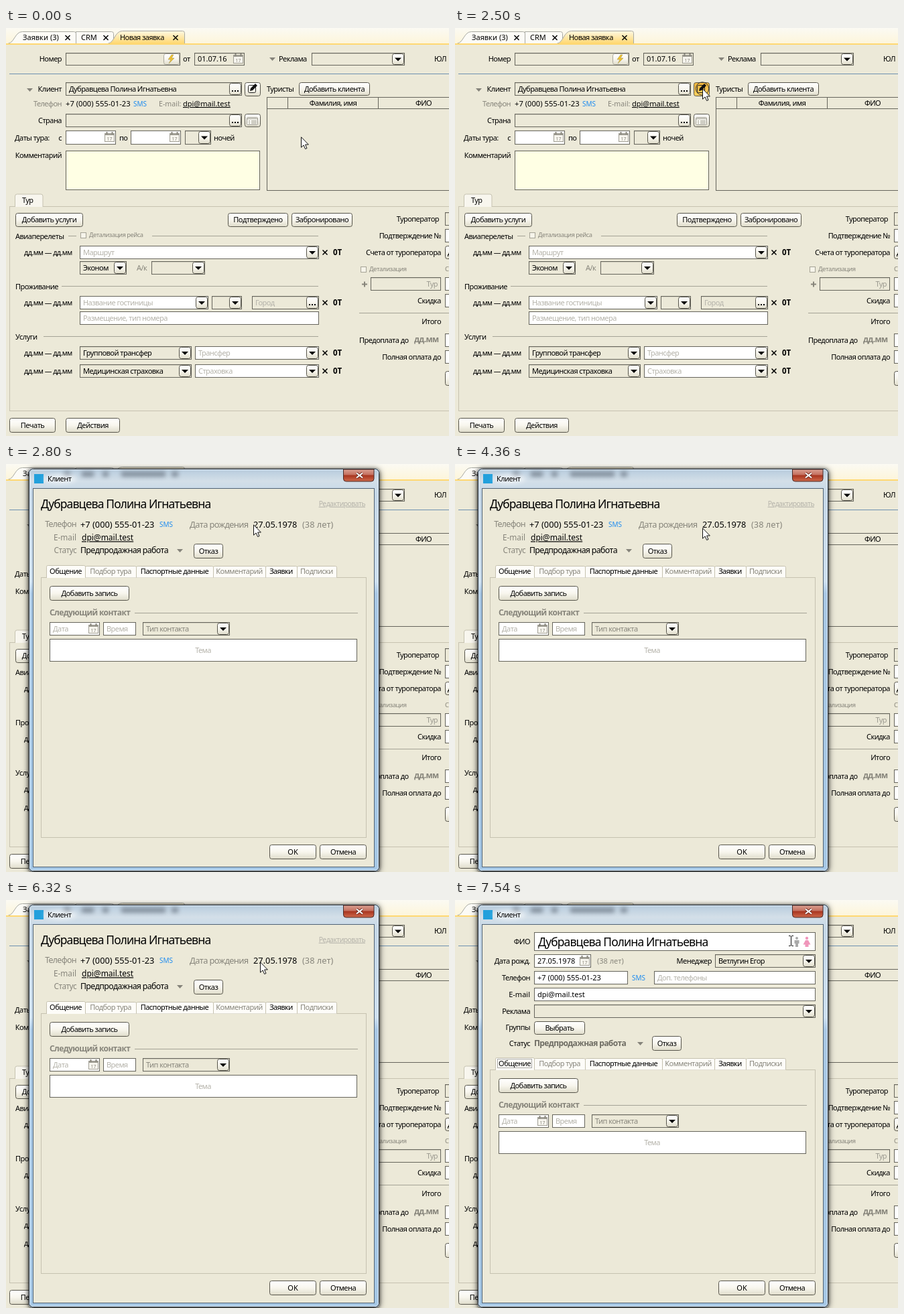
An HTML page that plays this animation: 661 by 609 pixels, repeating every 8 s.

```html
<!DOCTYPE html>
<html lang="ru">
<head>
<meta charset="utf-8">
<title>Заявка</title>
<style>
html, body { margin: 0; width: 100%; height: 100%; overflow: hidden; background: #ece9d8; }
svg { display: block; width: 661px; height: 609px; font-family: "Noto Sans", "Open Sans", sans-serif; }
.tight { letter-spacing: -.05em; }
</style>
</head>
<body>
<svg id="stage" viewBox="0 0 661 609" xmlns="http://www.w3.org/2000/svg"></svg>
<script>
const LOOP = 8000;
const BEIGE = '#ece9d8', WHITE = '#fff', EDGE = '#66655c', LINE = '#c6c2b0';
const GREY = '#87857b', PALE = '#b5b3aa', BLUE = '#1e8cf0';
const NAME = 'Дубравцева Полина Игнатьевна', PHONE = '+7 (000) 555-01-23', MAIL = 'dpi@mail.test';

// Boxes run from x1,y1 up to, not including, x2,y2; text is placed by its vertical centre
const box = (x1, y1, x2, y2, fill, edge = EDGE, r = 0) =>
  `<rect x="${x1 + .5}" y="${y1 + .5}" width="${x2 - x1 - 1}" height="${y2 - y1 - 1}" rx="${r}" fill="${fill}" stroke="${edge}"/>`;
const path = (d, fill = 'none', edge = 'none', more = '') =>
  `<path d="${d}" fill="${fill}" stroke="${edge}" ${more}/>`;
const hline = (x1, x2, y, c = '#a5a396') => path(`M${x1} ${y + .5}H${x2}`, 'none', c);
const text = (x, y, s, c = '#000', size = 11, more = '') =>
  `<text x="${x}" y="${y + size * .36}" fill="${c}" font-size="${size}" ${/[\da-z]/i.test(s) ? '' : 'class="tight"'} ${more}>${s}</text>`;
const textR = (x, y, s, c, size, more = '') => text(x, y, s, c, size, 'text-anchor="end" ' + more);
const textC = (x, y, s, c, size, more = '') => text(x, y, s, c, size, 'text-anchor="middle" ' + more);
const BOLD = 'font-weight="bold"', UNDER = 'text-decoration="underline"';
const at = (x, y, s) => `<g transform="translate(${x} ${y})">${s}</g>`;

// Widgets
const button = (x1, y1, x2, y2, s = '', id = '') =>
  `<g ${id && `id="${id}"`}>${box(x1, y1, x2, y2, 'url(#btn)', '#57554b', 3)}</g>` +
  textC((x1 + x2) / 2, (y1 + y2) / 2, s);
const field = (x1, y1, x2, y2, s = '', fill = WHITE, c = PALE) =>
  box(x1, y1, x2, y2, fill) +
  (fill === BEIGE ? hline(x1 + 1, x2 - 1, y1 + 1, '#d3d0c0') : '') +
  text(x1 + 5, (y1 + y2) / 2, s, c);
const combo = (x1, y1, x2, y2, s, fill, c) => {
  const cx = x2 - 10, cy = (y1 + y2) / 2;
  return field(x1, y1, x2, y2, s, fill, c) +
    box(x2 - 19, y1 + 1, x2 - 1, y2 - 1, 'url(#btn)', '#57554b', 3) +
    path(`M${cx - 5} ${cy - 2}h10l-5 5z`, '#000');
};
const dots = (x2, y1, y2) => box(x2 - 19, y1 + 1, x2 - 1, y2 - 1, 'url(#btn)', '#57554b', 3) +
  [-5, -1, 3].map(d => `<rect x="${x2 - 10 + d}" y="${y1 + 12}" width="2" height="2"/>`).join('');
const arrow = (x, y) => path(`M${x} ${y - 2}h9l-4.5 5z`, '#85837a');
const cross = (x, y) => path(`M${x - 3.5} ${y - 3.5}l7 7m0-7l-7 7`, 'none', '#000', 'stroke-width="1.5"');
const check = (x, y) => box(x, y, x + 9, y + 9, '#f6f4ea', '#a5a396');
const calendar = (x, y) => box(x, y + 2, x + 15, y + 15, '#f7f5ee', '#a09e94') +
  `<rect x="${x}" y="${y + 2}" width="15" height="3" fill="#a09e94"/>` +
  path(`M${x + 3.5} ${y}v4m8-4v4`, 'none', '#88867c', 'stroke-width="2"') +
  textC(x + 7.5, y + 10, '17', '#88867c', 7);

const stops2 = list => list.map(([o, c]) => `<stop offset="${o}" stop-color="${c}"/>`).join('');
const gradient = (id, ...list) => `<linearGradient id="${id}" x2="0" y2="1">${stops2(list)}</linearGradient>`;
const defs = '<defs>' +
  gradient('btn', [0, '#fff'], [.5, '#f8f6ee'], [1, '#dfdcca']) +
  gradient('hover', [0, '#fff6d6'], [1, '#ffd873']) +
  gradient('press', [0, '#f3b63c'], [1, '#ffd261']) +
  gradient('active', [0, '#fff8e2'], [1, '#ffd872']) +
  gradient('strip', [0, '#fbfaf3'], [1, '#fdf5da']) +
  gradient('glass', [0, '#b7cbdd'], [.03, '#d3dfe8'], [.06, '#c6d8e8'], [.28, '#cfe1f1'], [.31, '#a9c8e5'], [1, '#a6c8e6']) +
  gradient('close', [0, '#dba092'], [.45, '#c4705f'], [.5, '#a8351f'], [1, '#cf6a4c']) +
  `<filter id="shadow" x="-10%" y="-10%" width="120%" height="120%">
<feDropShadow dx="0" dy="1" stdDeviation="2" flood-opacity=".6"/><feDropShadow dx="0" dy="1" stdDeviation="5" flood-opacity=".7"/></filter>
<filter id="blur" x="-20%" y="-100%" width="140%" height="300%"><feGaussianBlur stdDeviation="3"/></filter>
</defs>`;

function tabStrip() {
  const tab = (x1, x2, y, fill, slant) => path(slant
    ? `M${x1} 23C${x1 + 9} 22 ${x1 + 10} ${y} ${x1 + 21} ${y}H${x2 - 3}Q${x2} ${y} ${x2} ${y + 3}V23`
    : `M${x1} 23V${y}H${x2 - 3}Q${x2} ${y} ${x2} ${y + 3}V23`, fill, '#a9aaa3');
  return '<rect width="661" height="24" fill="url(#strip)"/>' +
    tab(104.5, 160.5, 5.5, '#fcfbf6') + tab(3.5, 104.5, 5.5, '#fcfbf6', true) +
    tab(152.5, 266.5, 4.5, 'url(#active)', true) +
    '<rect y="23" width="661" height="2" fill="#ffd872"/>' +
    text(25, 14, 'Заявки (3)') + cross(92, 14.5) + text(112, 14, 'CRM') + cross(149, 14.5) +
    text(170, 14, 'Новая заявка') + cross(253, 14.5);
}

function orderTop() {
  const lightning = path('M247 40l-5 7h4l-3 6 8-8h-4l3-5z', '#f0c22c', '#a8995c', 'stroke-width=".6"');
  const pencil = box(361, 85, 373, 97, 'none', '#222', 2) +
    path('M364 94l1-4 7-7 3 3-7 7z', '#111');
  const list = box(359, 133, 376, 145, '#faf9f2', '#98968b', 1) + hline(360, 375, 135, '#98968b') +
    [138, 140, 142].map(y => hline(362, 364, y) + hline(366, 374, y)).join('');
  return textR(83, 46, 'Номер') + field(89, 37, 260, 56, '', BEIGE) +
    box(235, 38, 259, 55, 'url(#btn)', '#aaa89b', 3) + lightning +
    text(264, 46, 'от') + field(281, 37, 356, 56, '01.07.16', BEIGE, '#000') + calendar(339, 38) +
    arrow(393, 46) + text(407, 46, 'Реклама') + combo(456, 37, 595, 56, '', BEIGE) + text(639, 46, 'ЮЛ') +
    hline(5, 661, 68, '#6f91b0') +
    arrow(31, 92) + textR(83, 91, 'Клиент') + field(89, 81, 352, 101, NAME, BEIGE, '#000') + dots(352, 81, 101) +
    button(356, 81, 380, 102, '', 'edit') + pencil +
    text(389, 91, 'Туристы') + button(437, 81, 543, 101, 'Добавить клиента') +
    textR(83, 113, 'Телефон', GREY) + text(89, 113, PHONE, '#000', 11.2) + text(190, 113, 'SMS', BLUE, 10) +
    text(228, 113, 'E-mail:', GREY, 10.6) + text(264, 113, MAIL, '#000', 11, UNDER) +
    textR(83, 138, 'Страна') + field(89, 128, 352, 148, '', BEIGE) + dots(352, 128, 148) +
    button(356, 128, 380, 148) + list +
    text(13, 164, 'Даты тура:') + textR(83, 164, 'с') +
    field(89, 153, 164, 174) + calendar(147, 155) + text(169, 164, 'по') +
    field(186, 153, 261, 174) + calendar(244, 155) +
    combo(267, 153, 306, 174, '', BEIGE) + text(310, 164, 'ночей') +
    textR(83, 190, 'Комментарий') + box(89, 183, 379, 242, '#ffffe4') +
    box(389, 103, 670, 243, BEIGE) + hline(390, 661, 120, EDGE) +
    path('M420.5 104v16M555.5 104v16', 'none', EDGE) +
    textC(488, 112, 'Фамилия, имя') + textC(623, 112, 'ФИО');
}

function orderTour() {
  const section = (y, s, x) => text(14, y, s) + hline(x, 466, y - 1);
  const dates = y => text(27, y, 'дд.мм — дд.мм', '#000', 10.7);
  const ends = y => cross(476, y) + text(488, y, '0Т', '#000', 11.5, BOLD);
  const label = (y, s) => textR(649, y, s);
  const stub = (y, fill) => field(655, y - 10, 680, y + 10, '', fill);
  return box(5, 266, 680, 572, 'none', LINE) +
    path('M13.5 267V251q0-3 3-3H52q3 0 3 3V267', '#f8f6ee', LINE) + text(24, 257, 'Тур') +
    button(14, 276, 115, 297, 'Добавить услуги') +
    button(331, 276, 421, 297, 'Подтверждено') + button(426, 276, 517, 297, 'Забронировано') +
    text(14, 311, 'Авиаперелеты') + hline(93, 105, 310) + check(111, 305) +
    text(124, 309, 'Детализация рейса', GREY, 9.3) + hline(218, 466, 310) +
    dates(335) + combo(110, 325, 467, 345, 'Маршрут') + ends(335) +
    combo(110, 348, 180, 368, 'Эконом', BEIGE, '#000') + text(195, 358, 'А/к', GREY) +
    combo(217, 348, 297, 368, '', BEIGE) +
    section(386, 'Проживание', 83) +
    dates(410) + combo(110, 400, 302, 420, 'Название гостиницы') + combo(307, 400, 352, 420, '', BEIGE) +
    field(367, 400, 467, 420, 'Город', BEIGE) + dots(467, 400, 420) + ends(410) +
    field(110, 423, 467, 443, 'Размещение, тип номера') +
    section(461, 'Услуги', 56) +
    dates(485) + combo(110, 475, 277, 495, 'Групповой трансфер', BEIGE, '#000') +
    combo(282, 475, 467, 495, 'Трансфер') + ends(485) +
    dates(512) + combo(110, 502, 277, 522, 'Медицинская страховка', BEIGE, '#000') +
    combo(282, 502, 467, 522, 'Страховка') + ends(512) +
    textR(646, 285, 'Туроператор') + stub(285, BEIGE) +
    label(310, 'Подтверждение №') + stub(310) +
    label(335, 'Счета от туроператора') + button(655, 325, 680, 345) + text(659, 335, 'Д') +
    check(529, 356) + text(542, 360, 'Детализация', GREY, 9.5) + text(655, 360, 'С', GREY, 9.5) +
    path('M531 382.5h8m-4-4v8', 'none', GREY, 'stroke-width="2"') +
    field(544, 372, 649, 392, '', BEIGE) + textR(644, 382, 'Тур', '#9a988e') + stub(382) +
    label(407, 'Скидка') + stub(407) + hline(527, 661, 425) + label(438, 'Итого') +
    text(527, 466, 'Предоплата до') + text(609, 465, 'дд.мм', GREY, 12, BOLD) + stub(466) +
    label(491, 'Полная оплата до') + stub(491) + button(655, 512, 680, 534) +
    button(5, 582, 74, 604, 'Печать') + button(89, 582, 170, 604, 'Действия');
}

function dialogFrame() {
  const smudge = (x, w) => `<rect x="${x}" y="11" width="${w}" height="8" fill="#5a6470"/>`;
  return '<rect x="34" y="7" width="523" height="601" rx="6" fill="#a9c8e5" filter="url(#shadow)"/>' +
    box(34, 7, 557, 608, 'url(#glass)', '#1c2733', 6) + box(35, 8, 556, 607, 'none', '#e4eff8', 5) +
    `<g filter="url(#blur)" opacity=".6">${smudge(86, 10)}${smudge(113, 18)}${smudge(144, 9)}${smudge(172, 66)}${smudge(247, 10)}</g>` +
    '<rect x="42" y="15" width="14" height="14" fill="#22a0dc"/>' +
    '<ellipse cx="81" cy="22" rx="24" ry="7" fill="#fff" opacity=".6" filter="url(#blur)"/>' + text(62, 22, 'Клиент') +
    path('M503.5 8V22q0 4 4 4H545q4 0 4-4V8z', 'url(#close)', '#4a2a26') +
    path('M523 13.5l9 7m0-7l-9 7', 'none', '#6b2a20', 'stroke-width="4"') +
    path('M523 13.5l9 7m0-7l-9 7', 'none', '#fff', 'stroke-width="2.2"') +
    box(40, 36, 550, 602, BEIGE, '#4f6275') +
    button(393, 568, 463, 590, 'OK') + button(468, 568, 538, 590, 'Отмена');
}

// Tabbed area of the client window; y is the top of the panel
function tabPanel(y, loaded) {
  const names = ['Общение', 'Подбор тура', 'Паспортные данные', 'Комментарий', 'Заявки', 'Подписки'];
  const edges = [60, 118, 194, 309, 387, 434, 493];
  const live = loaded ? [0, 2, 4] : [0, 2];
  const tabs = names.map((s, i) => {
    const top = y - (i ? 17 : 18), foot = y + (i ? .5 : 1);
    const fill = i || loaded ? '#fdfcf8' : BEIGE;
    return path(`M${edges[i] + .5} ${foot}V${top + 2.5}q0-2 2-2H${edges[i + 1] - 1.5}q2 0 2 2V${foot}`, fill, LINE) +
      textC((edges[i] + edges[i + 1]) / 2, y - 9, s, live.includes(i) ? '#000' : GREY);
  }).join('');
  const record = button(65, 13, 184, 35, 'Добавить запись') +
    text(65, 53, 'Следующий контакт', GREY, 12, BOLD) + hline(192, 525, 53) +
    field(65, 67, 140, 87, 'Дата') + calendar(123, 69) + field(145, 67, 194, 87, 'Время') +
    combo(204, 67, 334, 87, 'Тип контакта', BEIGE, GREY) +
    field(65, 92, 524, 126) + textC(294, 109, 'Тема', PALE);
  return box(52, y, 538, 558, 'none', LINE) + tabs +
    (loaded ? at(0, y, record) : textC(294, 361, 'Загрузка данных...', GREY, 10.7));
}

function viewForm(loaded) {
  return text(52, 60, NAME, '#000', 17.4) + textR(536, 59, 'Редактировать', PALE, 10.3, UNDER) +
    textR(105, 90, 'Телефон', GREY, 12.3) + text(111, 90, PHONE, '#000', 12.8) + text(229, 90, 'SMS', BLUE, 10) +
    text(274, 90, 'Дата рождения', GREY, 12.8) + text(369, 90, '27.05.1978', '#000', 12.8) +
    text(442, 90, '(38 лет)', GREY, 12.8) +
    textR(105, 110, 'E-mail', GREY, 11.8) + text(113, 110, MAIL, '#000', 12, UNDER) +
    textR(105, 129, 'Статус', GREY, 11.8) + text(111, 129, 'Предпродажная работа', '#000', 12.3) + arrow(255, 129) +
    (loaded ? button(280, 119, 324, 141, 'Отказ') : '') +
    tabPanel(loaded ? 169 : 165, loaded);
}

function editForm() {
  const label = (y, s) => textR(112, y, s);
  const man = '<circle cx="510" cy="57" r="2"/>' + path('M506.5 60h7v5h-1.5v5h-4v-5h-1.5z', '#a9a9a9');
  const woman = '<circle cx="525" cy="57" r="2.2"/>' + path('M523 60h4l3.5 6.5h-3v3.5h-5v-3.5h-3z', '#f096bb');
  return label(62, 'ФИО') + field(118, 48, 538, 76) + text(124, 62.5, NAME, '#000', 17.4) +
    `<g fill="#a9a9a9">${man}</g><g fill="#f096bb">${woman}</g>` +
    label(91, 'Дата рожд.') + field(118, 81, 203, 101, '27.05.1978', WHITE, '#000') + calendar(186, 83) +
    text(212, 91, '(38 лет)', GREY) + textR(383, 91, 'Менеджер') + combo(388, 81, 538, 101, 'Ветлугин Егор', BEIGE, '#000') +
    label(116, 'Телефон') + field(118, 106, 258, 126, PHONE, WHITE, '#000') + text(264, 116, 'SMS', BLUE, 10) +
    field(297, 106, 538, 126, 'Доп. телефоны') +
    label(141, 'E-mail') + field(118, 131, 538, 151, MAIL, WHITE, '#000') +
    label(166, 'Реклама') + combo(118, 156, 538, 176, '', BEIGE) +
    label(190, 'Группы') + button(118, 181, 194, 201, 'Выбрать') +
    label(214, 'Статус') + text(118, 214, 'Предпродажная работа', '#6e6c63', 12, BOLD) + arrow(272, 214) +
    button(294, 203, 338, 225, 'Отказ') + tabPanel(253, true) +
    '<rect x="63.5" y="237.5" width="51" height="13" fill="none" stroke="#555" stroke-dasharray="1 1"/>';
}

const pointers = {
  arrow: path('M.5 .8V16.2L4.1 12.9 6.6 18.5 9 17.5 6.6 12H11.4Z', '#fff', '#111', 'stroke-linejoin="round"'),
  hand: at(-6, 0, path('M5 2q1.5-2.4 3 0V8q1.6-1 2.7.4 1.7-.8 2.6.6 1.8-.4 2.2 1.2V15q0 3-2 5v1.5H6.5V20Q4 17 1.5 13.5 .3 11.3 2 10.8q1.5 0 3 2.2z', '#fff', '#111', 'stroke-linejoin="round"') +
    path('M8 8v4m2.7-3.5V12m2.6-3v3', 'none', '#111', 'stroke-width=".8"')),
  beam: path('M-3 -7.5h2.2l1.3 1 1.3-1H4M.5 -7V7M-3 7.5h2.2l1.3-1 1.3 1H4', 'none', '#111')
};
const group = (id, s) => `<g id="${id}">${s}</g>`;

document.getElementById('stage').innerHTML = defs + `<rect width="661" height="609" fill="${BEIGE}"/>` +
  tabStrip() + orderTop() + orderTour() +
  group('dialog', dialogFrame()) + group('loading', viewForm(false)) +
  group('view', viewForm(true)) + group('form', editForm()) +
  group('pointer', '<circle id="ring" cy=".5" r="9.7" fill="none" stroke="#333"/>' +
    Object.entries(pointers).map(([k, s]) => group(k, s)).join(''));

const $ = id => document.getElementById(id);
const show = (id, on) => { $(id).style.display = on ? '' : 'none'; };

// Pointer stops: time, x, y
const stops = [
  [0, 440, 162], [500, 436, 162], [660, 425, 159], [820, 413, 145], [960, 397, 128],
  [1110, 384, 112], [1240, 376, 100], [1370, 371, 92], [1520, 369, 90],
  [4360, 369, 95], [4490, 370, 96], [5170, 370, 97], [5320, 371, 97], [6320, 379, 92],
  [6460, 411, 79], [6590, 453, 65], [6740, 480, 62], [6870, 498, 60], [7020, 501, 60], [7540, 501, 61]
];

function draw(t) {
  const [, x, y] = stops.filter(s => s[0] <= t).pop();
  const kind = t >= 7540 ? 'beam' : t >= 6740 ? 'hand' : 'arrow';
  const press = t >= 2500 && t < 2660;
  $('pointer').setAttribute('transform', `translate(${x} ${y})`);
  for (const k in pointers) show(k, k === kind);
  show('ring', press || (t >= 7290 && t < 7540));
  $('edit').firstChild.setAttribute('fill', `url(#${press ? 'press' : t >= 1370 ? 'hover' : 'btn'})`);
  show('dialog', t >= 2660);
  show('loading', t >= 2660 && t < 2800);
  show('view', t >= 2800 && t < 7540);
  show('form', t >= 7540);
}

const start = performance.now();
function tick(now) {
  draw(Math.max(0, now - start) % LOOP);
  requestAnimationFrame(tick);
}
draw(0);
requestAnimationFrame(tick);
</script>
</body>
</html>
```
